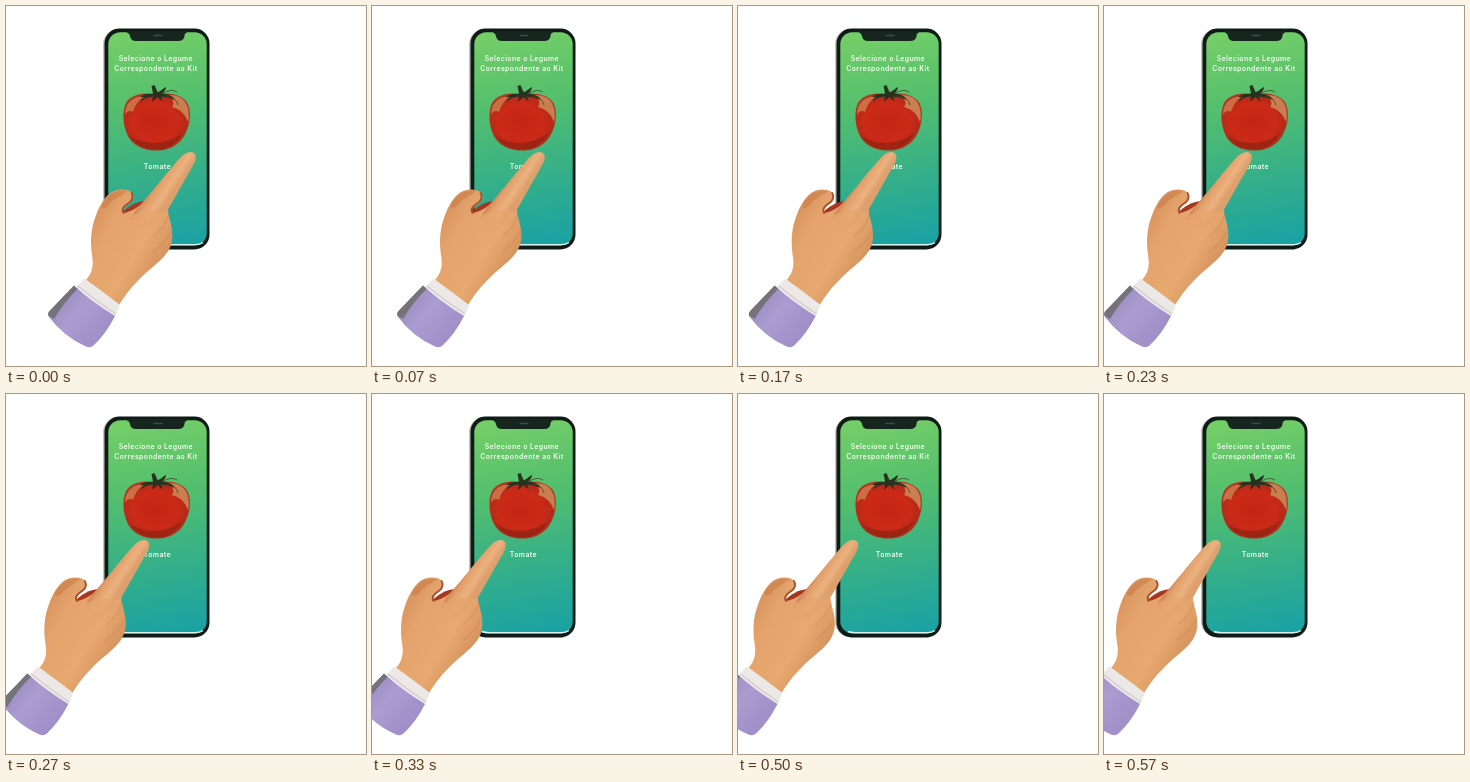
Recreate the animation shown at these times as an HTML page. Size 360 px wide and 360 px high, loop 5010 ms.

```html
<!DOCTYPE html>
<html lang="pt">
<head>
<meta charset="utf-8">
<title>Selecione o Legume</title>
<style>
html, body { margin: 0; width: 100%; height: 100%; overflow: hidden; background: #fff; }
svg { display: block; width: 100vw; height: 100vh; }
text { font: 600 6.9px Inter, "Open Sans", sans-serif; letter-spacing: .4px; fill: #f4fff0; text-anchor: middle; }
</style>
</head>
<body>
<svg viewBox="0 0 360 360">
  <defs>
    <linearGradient id="screen" x1="0.46" y1="0" x2="0.54" y2="1">
      <stop offset="0" stop-color="#73ce67"/>
      <stop offset=".35" stop-color="#52be6e"/>
      <stop offset=".65" stop-color="#38b186"/>
      <stop offset="1" stop-color="#1ba2a3"/>
    </linearGradient>
    <radialGradient id="tomato" cx=".47" cy=".5" r=".56">
      <stop offset="0" stop-color="#c32414"/>
      <stop offset=".6" stop-color="#cb2a18"/>
      <stop offset=".85" stop-color="#b52a18"/>
      <stop offset="1" stop-color="#a5452a"/>
    </radialGradient>
    <linearGradient id="skin" gradientUnits="userSpaceOnUse" x1="88" y1="208" x2="158" y2="250">
      <stop offset="0" stop-color="#d8945f"/>
      <stop offset=".25" stop-color="#e4a36c"/>
      <stop offset=".7" stop-color="#e7a970"/>
      <stop offset="1" stop-color="#d7945e"/>
    </linearGradient>
    <linearGradient id="finger" gradientUnits="userSpaceOnUse" x1="149" y1="174" x2="167" y2="186">
      <stop offset="0" stop-color="#cb8150"/>
      <stop offset=".3" stop-color="#e2a06b"/>
      <stop offset=".7" stop-color="#ebb27f"/>
      <stop offset="1" stop-color="#dd9f6c"/>
    </linearGradient>
    <linearGradient id="sleeve" gradientUnits="userSpaceOnUse" x1="56" y1="292" x2="96" y2="326">
      <stop offset="0" stop-color="#9d8fc2"/>
      <stop offset=".4" stop-color="#aa9cd0"/>
      <stop offset="1" stop-color="#a08fc8"/>
    </linearGradient>
  </defs>

  <g id="phone">
    <rect x="97" y="23" width="106" height="220" rx="15" fill="#c3c6bb"/>
    <rect x="98.500" y="22.500" width="105" height="221" rx="15" fill="#0f1b17"/>
    <rect x="102.300" y="26.300" width="98.400" height="213" rx="12" fill="url(#screen)"/>
    <path d="M121 25H181V26.500Q178.500 27 178.500 30Q178 35 172 35H130Q124.500 35 124 30Q123.500 27 121 26.500Z" fill="#17251f"/>
    <path d="M148 29.500H156" stroke="#2f5347" stroke-width="1.300" stroke-linecap="round"/>
    <path d="M110 237.500Q113 238.700 117 238.700H189Q194 238.700 197 236.500" fill="none" stroke="#d9f1ed" stroke-width="1.500"/>
    <text x="149.900" y="54.500">Selecione o Legume</text>
    <text x="149.900" y="64.800">Correspondente ao Kit</text>
    <text x="151.400" y="162.700" font-weight="700">Tomate</text>
  </g>

  <g id="fruit">
    <path d="M150 90C160 85 176 88 181.500 97C186.500 106 184 125 174 135.500C166 143 158 144.500 150 144.500C141 144.500 131 142 124.500 134C117.500 125 115.500 108 119.500 98C124 88 141 85 150 90Z" fill="url(#tomato)"/>
    <path d="M119 109C119 98 125 91 138 90C131 96 129 100 127 106C124 104 121 105 119 109Z" fill="#cf7a4c" opacity=".85"/>
    <path d="M162 89.500C173 88 180 94 182 103C183 108 183 112 182 116C179 108 174 103 166 101C169 97 167 93 162 89.500Z" fill="#cc8656" opacity=".9"/>
    <path d="M123 129C134 139 161 141 177 126C169 141 159 143.500 150 143.500C140 143.500 130 140 123 129Z" fill="#86200f" opacity=".55"/>
    <path d="M134 91C139 87 144 88 147 87.500L145.500 80L148.500 79L151.500 86C155 85.500 157 82 160 81C160 84 158 86 156.500 87.500C162 88 167 90 169 94C163 91.500 159 91 155 90.500L157 96L151.500 91L146 96L147 90.500C142 91 138 92 135 96C135 93 137 92 139 91Z" fill="#27331f"/>
    <path d="M156 88Q165 82 171 86M160 90Q170 91 172 99" fill="none" stroke="#3b4a27" stroke-width=".8"/>
  </g>

  <g id="hand">
    <path d="M117 206C122 200 130 196 139 195L136 210L118 211Z" fill="#a8371f"/>
    <path d="M80 274C86 267 88 260 86 249C84 236 85 223 89 212C92 203 96 195 102 189C108 183 119 182 125 186C129.500 190 127 195 123 198C119 201 117 203 117.500 207C125 206 132 201 138 196L162 204C162 211 168 222 166 235C164 246 156 253 148 260C137 269 124 281 113 299Z" fill="url(#skin)"/>
    <path d="M130 204C143 190 162 165 174 152C179 146 186 144 189 148C191.500 152 188 158 185 163C177 177 168 193 160 207C150 221 136 222 124 213C127 209 129 206 130 204Z" fill="url(#finger)"/>
    <path d="M122 211C137 204 153 202 160 206C156 220 136 229 116 222Z" fill="#e6a66f" opacity=".8"/>
    <path d="M117.500 207C115 203 118 200 122 197.500C126 195 128 191 125.500 187" fill="none" stroke="#a94f2c" stroke-width="1.800" stroke-linecap="round"/>
    <path d="M163 208C160 218 155 225 148 230M165 226C160 236 153 242 146 246" fill="none" stroke="#b56f48" stroke-width="1.500" stroke-linecap="round" opacity=".2"/>
    <path d="M96 199C102 188 111 183 121 185C116 190 108 192 103 199C99 203 95 203 96 199Z" fill="#c4733f" opacity=".45"/>
    <path d="M78.500 272.500Q96 285 114 299L109 310.500Q88 297 70 281Z" fill="#ece8e5"/>
    <path d="M72 280Q90 295 110 308" fill="none" stroke="#d2ccd2" stroke-width="1.300"/>
    <path d="M68 279.500Q86 296 109 310Q100 328 87 340Q84 342 80 340.500Q58 331 43 311Q41 308 43.500 305Z" fill="url(#sleeve)"/>
    <path d="M68 279.500L71.500 283Q58 296 48 313L43 310Q41 308 43.500 305Z" fill="#75737a"/>
  </g>
</svg>
<script>
const hand = document.getElementById("hand");
const LOOP = 5010, LAST = 17;
// [step, pixels moved left]
const path = [[0, 0], [2, 17], [4, 26], [7, 42], [10, 56], [13, 66], [LAST, 73]];

function shift(step) {
  const i = Math.max(1, path.findIndex(p => p[0] >= step));
  const [a, x] = path[i - 1], [b, y] = path[i];
  return x + (y - x) * (step - a) / (b - a);
}

// 30 steps a second, snapped to 10 ms ticks
function draw(ms) {
  const tick = Math.floor(ms % LOOP / 10);
  const step = Math.min(LAST, Math.floor((tick * 3 + 1) / 10));
  hand.setAttribute("transform", `translate(${-shift(step)} 0)`);
}

const start = performance.now();
function loop() {
  draw(performance.now() - start);
  requestAnimationFrame(loop);
}
loop();
</script>
</body>
</html>
```
